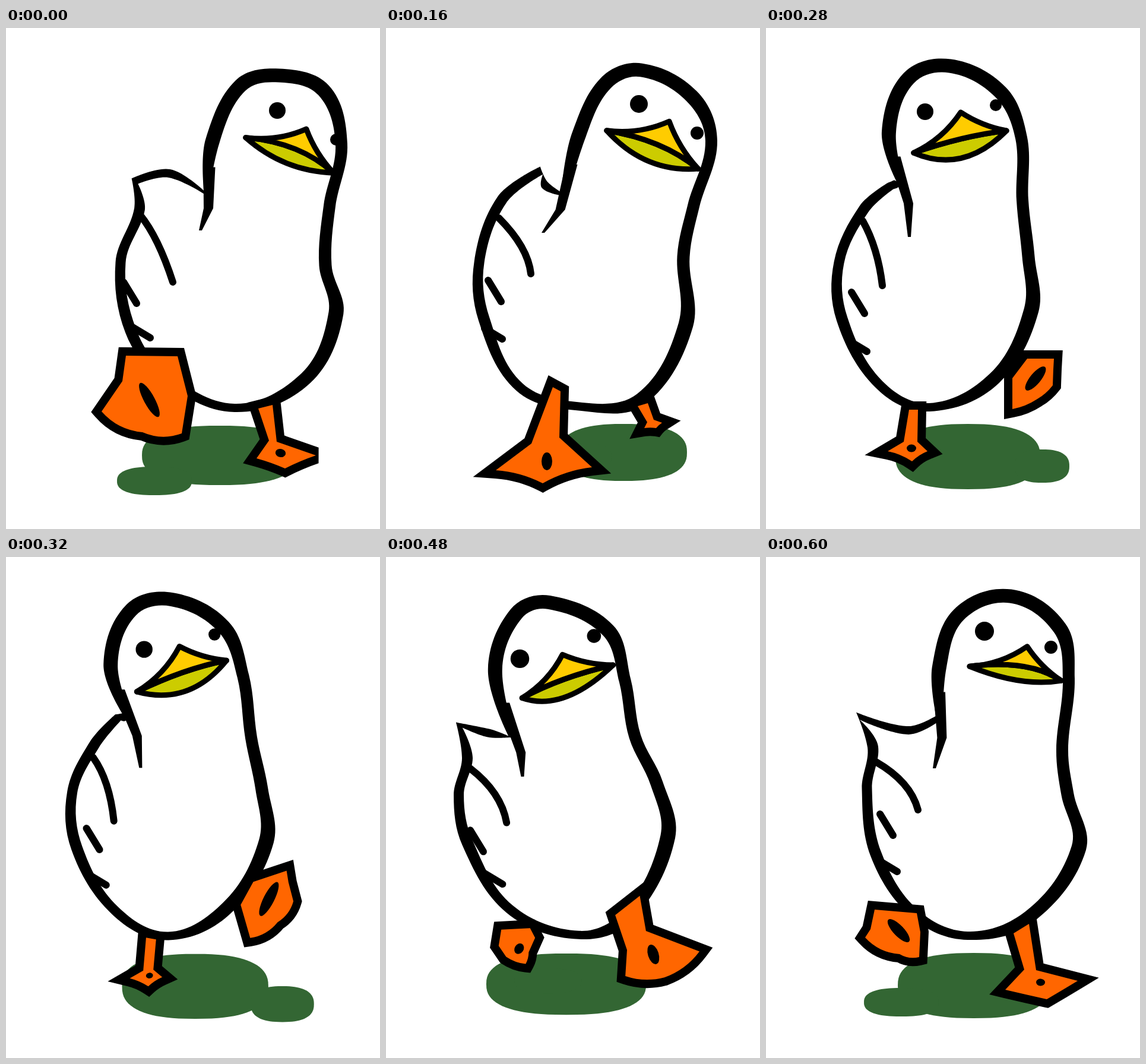
Animation of 630x844 px, one loop 640 ms. Source, as an HTML page with a canvas:

```html
<!DOCTYPE html>
<html lang="en">
<head>
<meta charset="utf-8">
<title>Walking duck</title>
<style>
  html, body { margin: 0; width: 100%; height: 100%; overflow: hidden; background: #fff; }
  canvas { display: block; width: 100vw; height: 100vh; }
</style>
</head>
<body>
<canvas id="stage" width="630" height="844"></canvas>
<script>
const LOOP = 640, STEP = 40, GROUND = 650;
const TIMES = [0, 80, 160, 280, 400, 520, 600];
const LIFTS = { 2: 15, 5: 13 }; // hop after these poses
const GREEN = "#336633", ORANGE = "#ff6600", YELLOW = "#ffcc00", OLIVE = "#cccc00";
const ctx = document.getElementById("stage").getContext("2d");
let blend = []; // [pose, weight] pairs for the current moment

// One string of x y pairs per pose; returns a function giving the points now
function track(...poses) {
  const rows = poses.map(s => s.split(" ").map(Number));
  return () => {
    const v = rows[0].map((_, j) => blend.reduce((sum, [i, w]) => sum + rows[i][j] * w, 0));
    return v.flatMap((x, j) => j % 2 ? [] : [[x, v[j + 1]]]);
  };
}

const mix = (a, b, u) => [a[0] + (b[0] - a[0]) * u, a[1] + (b[1] - a[1]) * u];
const add = (p, x, y) => [p[0] + x, p[1] + y];
const dist = (a, b) => Math.hypot(b[0] - a[0], b[1] - a[1]);

function fill(color) { ctx.fillStyle = color; ctx.fill(); }

function stroke(width, join = "round") {
  ctx.strokeStyle = "#000";
  ctx.lineWidth = width;
  ctx.lineJoin = join;
  ctx.lineCap = "round";
  ctx.stroke();
}

function start(p) { ctx.beginPath(); ctx.moveTo(...p); }

// Quadratic curve from a to b that passes through m
function arc(a, m, b) {
  ctx.quadraticCurveTo(2 * m[0] - (a[0] + b[0]) / 2, 2 * m[1] - (a[1] + b[1]) / 2, ...b);
}

// Middle of a-b, pushed sideways by a share of its length
function bow(a, b, k) {
  return add(mix(a, b, 0.5), (a[1] - b[1]) * k, (b[0] - a[0]) * k);
}

const shadows = track(
  "360 720 131 50 250 763 63 24", "386 713 117 51 254 778 72 32",
  "400 715 107 48 340 722 40 22", "340 722 122 55 465 738 46 28",
  "287 724 124 52 411 775 67 32", "318 718 138 52 215 692 52 17",
  "350 722 128 55 228 750 63 24");

function drawShadows() {
  const [c1, r1, c2, r2] = shadows();
  const bulge = x => Math.sign(x) * Math.abs(x) ** 0.8;
  for (const [c, r] of [[c1, r1], [c2, r2]]) {
    ctx.beginPath();
    for (let i = 0; i < 80; i++) {
      const a = i * Math.PI / 40;
      ctx.lineTo(c[0] + r[0] * bulge(Math.cos(a)), c[1] + r[1] * bulge(Math.sin(a)));
    }
    fill(GREEN);
  }
}

// Head top down the right side to the hip
const front = track(
  "460 80 535 105 565 195 545 300 538 400 556 480 505 590",
  "458 82 535 115 561 205 550 300 540 390 540 495 475 610",
  "430 71 515 115 548 190 518 300 501 385 505 500 430 625",
  "310 64 395 108 430 185 432 290 442 385 447 475 385 590",
  "245 89 338 140 365 235 395 335 425 400 440 490 365 600",
  "305 69 405 115 433 195 440 290 475 375 495 465 430 605",
  "412 66 495 120 510 205 499 325 508 400 527 490 445 605");

// Closed curve with handles scaled to each segment; corners get none
function smooth(p, dirs, corners) {
  start(p[0]);
  p.forEach((a, i) => {
    const j = (i + 1) % p.length, b = p[j], k = dist(a, b) * 0.35;
    const ka = corners.includes(i) ? 0 : k, kb = corners.includes(j) ? 0 : k;
    ctx.bezierCurveTo(...add(a, dirs[i][0] * ka, dirs[i][1] * ka),
      ...add(b, -dirs[j][0] * kb, -dirs[j][1] * kb), ...b);
  });
}

// Bottom, up the left side, round the tail and up the neck
const back = track(
  "385 640 265 585 210 510 193 395 225 305 217 258 275 245 337 279 348 190 395 97",
  "390 643 275 590 195 515 182 395 215 308 241 248 283 261 325 287 350 180 405 100",
  "330 638 225 605 165 490 157 395 195 290 262 240 268 265 300 280 325 180 370 93",
  "275 639 190 600 128 490 123 395 165 305 210 266 218 263 226 258 207 175 240 85",
  "290 637 180 585 113 490 98 400 122 338 148 275 165 288 177 290 142 195 180 103",
  "340 637 225 598 153 480 139 400 150 335 120 284 185 298 238 302 216 185 250 92",
  "340 638 250 600 185 500 170 390 180 320 155 268 240 292 292 270 292 185 325 97");

const INK = [23, 24, 20, 20, 21, 25, 22, 14, 16, 19, 17, 18, 14, 14, 12, 24, 24];
const TAIL = 12, NAPE = 14;

function drawBody() {
  const p = [...front(), ...back()], n = p.length;
  const dirs = p.map((_, i) => {
    const a = p[(i + n - 1) % n], b = p[(i + 1) % n], d = dist(a, b);
    return [(b[0] - a[0]) / d, (b[1] - a[1]) / d];
  });
  for (const [side, color] of [[0.5, "#000"], [-0.5, "#fff"]]) {
    const edge = p.map((q, i) => add(q, dirs[i][1] * INK[i] * side, -dirs[i][0] * INK[i] * side));
    smooth(edge, dirs, [TAIL, NAPE]);
    fill(color);
  }
  return p;
}

const neckTip = track("327 341", "306 331", "264 345", "241 352", "203 362", "248 371", "283 356");

function drawNeck(body) {
  const nape = body[NAPE], [tip] = neckTip();
  const base = mix(nape, body[NAPE + 1], 0.5), waist = mix(nape, tip, 0.4);
  start(add(base, -10, 0));
  for (const q of [add(base, 10, 0), add(waist, 16, 0), add(tip, 3, 0), add(tip, -2, 0), waist])
    ctx.lineTo(...q);
  fill("#000");
}

const wing = track(
  "226 315 255 362 281 428", "214 325 258 365 282 418", "190 320 228 368 244 414",
  "163 325 184 375 196 434", "120 365 152 402 167 462", "158 350 203 395 225 438",
  "185 345 232 382 256 426");

function drawWing() {
  const [a, m, b] = wing();
  start(a);
  arc(a, m, b);
  stroke(12);
}

const plumes = track("220 464 243 522", "221 463 208 500", "194 461 196 524",
  "166 481 170 545", "148 513 176 563", "177 485 207 543", "214 469 221 530");

function drawPlumes() {
  const [a, b] = plumes();
  for (const [tip, x, y] of [[a, -22, -36], [b, -30, -18]]) {
    start(add(tip, x, y));
    ctx.lineTo(...tip);
    stroke(12);
  }
}

// Left corner, ridge, right corner, chin
const beak = track(
  "398 183 509 165 557 247 470 233", "413 172 512 169 555 252 480 232",
  "366 171 480 152 531 240 440 230", "243 212 328 136 411 172 330 225",
  "187 256 253 167 338 190 275 248", "254 225 334 152 425 179 330 235",
  "337 184 442 145 503 210 425 213");

function drawBeak() {
  const raw = beak(), mid = mix(mix(raw[0], raw[2], 0.5), mix(raw[1], raw[3], 0.5), 0.5);
  const [l, t, r, b] = raw.map(q => mix(q, mid, Math.min(0.2, 6 / dist(q, mid))));
  const mouth = mix(t, b, 0.58);
  start(l);
  arc(l, mouth, r);
  arc(r, b, l);
  fill(OLIVE);
  stroke(9);
  start(l);
  arc(l, bow(l, t, 0.07), t);
  arc(t, bow(t, r, 0.05), r);
  arc(r, mouth, l);
  fill(YELLOW);
  stroke(9);
}

// Two centres, then the two radii
const eyes = track("457 139 556 188 14 10", "460 139 549 198 14 9", "426 128 524 177 15 11",
  "268 141 387 130 14 10", "196 184 310 142 15 11", "257 159 385 131 16 12", "368 125 480 152 16 11");

function drawEyes() {
  const [a, b, radii] = eyes();
  [a, b].forEach((q, i) => {
    ctx.beginPath();
    ctx.arc(...q, radii[i], 0, 7);
    fill("#000");
  });
}

// Leg top, ankle, three toes, ankle, leg top
const leftFoot = track(
  "202 552 196 595 161 646 230 681 296 683 306 620 289 553",
  "212 516 207 565 165 611 258 682 277 687 303 615 307 548",
  "281 605 245 700 185 745 264 767 347 740 292 690 294 612",
  "241 643 232 697 205 713 246 730 272 713 255 697 256 643",
  "228 627 226 690 210 704 230 712 258 697 243 682 253 637",
  "180 625 174 638 195 658 237 674 236 655 256 625 240 618",
  "183 594 176 627 167 641 225 669 258 674 260 632 254 600");

const leftMark = track("226 598 257 655", "238 578 268 649", "271 715 271 745",
  "237 708 253 708", "238 697 238 697", "210 650 228 634", "206 611 241 648");

function drawFoot(foot, mark) {
  const p = foot();
  // A wide top means a raised sole, whose toe edge swells outward
  const bend = 0.1 * Math.max(-1, Math.min(1, (dist(p[0], p[6]) - 30) / 30));
  start(p[0]);
  for (let i = 1; i < 7; i++) {
    if (i === 3 || i === 4) arc(p[i - 1], bow(p[i - 1], p[i], bend), p[i]);
    else ctx.lineTo(...p[i]);
  }
  ctx.closePath();
  ctx.miterLimit = 3;
  stroke(28, "miter");
  fill(ORANGE);

  const [a, b] = mark(), len = dist(a, b);
  ctx.beginPath();
  ctx.ellipse(...mix(a, b, 0.5), len / 2, Math.min(9, len * 0.4),
    Math.atan2(b[1] - a[1], b[0] - a[0]), 0, 7);
  fill("#000");
}

const rightFoot = track(
  "425 641 443 695 422 725 470 742 522 720 456 697 449 635",
  "427 640 433 700 425 710 466 718 496 701 455 693 460 627",
  "424 637 440 664 435 674 455 674 465 665 451 660 441 632",
  "440 557 415 590 415 642 457 625 483 602 484 575 485 557",
  "362 553 363 605 407 658 460 620 489 562 447 525 432 494",
  "403 627 429 688 402 727 473 748 543 713 438 682 430 610",
  "417 634 435 695 403 729 473 745 525 714 455 696 443 618");

const rightMark = track("454 714 471 718", "456 704 456 704", "450 667 450 667",
  "470 571 438 610", "426 538 416 618", "456 708 474 716", "455 716 470 717");

// Weights of the four nearest poses; returns how far the body hops
function setTime(t) {
  const n = TIMES.length;
  let i = n - 1;
  while (TIMES[i] > t) i--;
  const at = k => TIMES[(k + n) % n] + Math.floor(k / n) * LOOP;
  const span = at(i + 1) - at(i), u = (t - at(i)) / span;
  const ease = u * u * (3 - 2 * u);
  const out = u * (1 - u) ** 2 * span / (at(i + 1) - at(i - 1));
  const into = u * u * (u - 1) * span / (at(i + 2) - at(i));
  blend = [-out, 1 - ease - into, ease + out, into].map((w, k) => [(i + k - 1 + n) % n, w]);
  return (LIFTS[i] || 0) * Math.sin(Math.PI * u);
}

function draw(t) {
  const hop = setTime(t), grow = 1 + hop / 600;
  ctx.fillStyle = "#fff";
  ctx.fillRect(0, 0, 630, 844);
  drawShadows();
  ctx.save();
  ctx.transform(1, 0, 0, grow, 0, GROUND * (1 - grow));
  const body = drawBody();
  drawNeck(body);
  drawWing();
  drawPlumes();
  drawBeak();
  drawEyes();
  ctx.restore();
  drawFoot(leftFoot, leftMark);
  drawFoot(rightFoot, rightMark);
}

function tick() {
  draw(Math.floor(performance.now() % LOOP / STEP) * STEP);
  requestAnimationFrame(tick);
}
tick();
</script>
</body>
</html>
```
